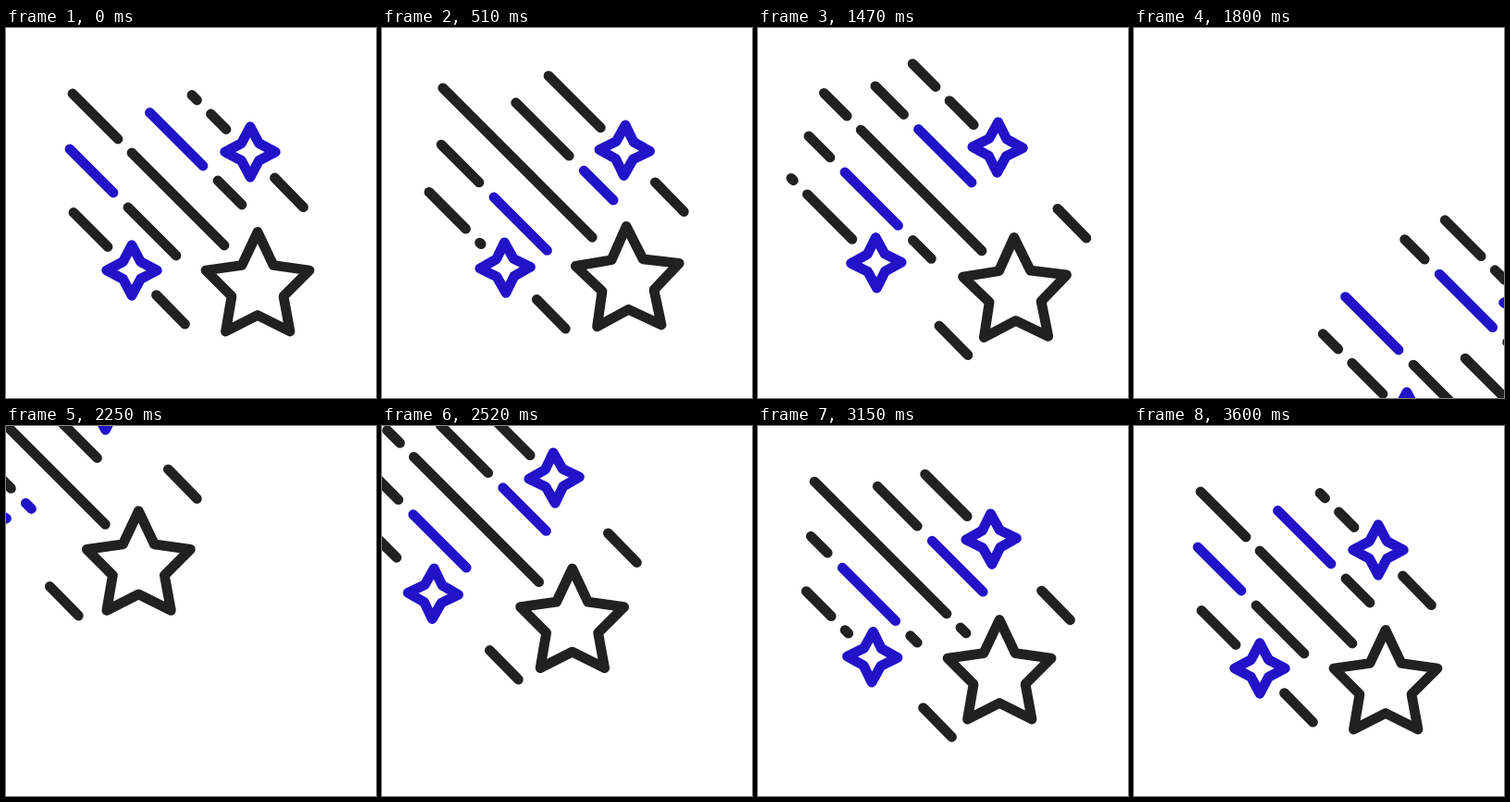
Write an HTML page that moves like this. It is 400 px wide and 400 px high and loops after 5630 ms.

```html
<!DOCTYPE html>
<html lang="en">
<head>
<meta charset="utf-8">
<title>Shooting stars</title>
<style>
  html, body { margin: 0; width: 100%; height: 100%; overflow: hidden; background: #fff; }
  svg { display: block; width: 100%; height: 100%; }
  path { fill: none; stroke-width: 10.8; stroke-linecap: round; stroke-linejoin: round; }
  .dark { stroke: #212121; }
  .blue { stroke: #2212c8; }
</style>
</head>
<body>
<svg viewBox="0 0 400 400">
  <g id="trails"></g>
  <path id="dashR" class="dark" d="M290.5 162l31 31.7"/>
  <path id="dashL" class="dark" d="M162.5 288.6l31 31.6"/>
  <path id="sparkR" class="blue"/>
  <path id="sparkL" class="blue"/>
  <path id="star" class="dark"
    d="M272 220.5L289 256.5L328 262L300 290L307 328L272 310.5L237.5 328L244 290L216 262L255 256.5Z"/>
</svg>
<script>
const LOOP = 5630, END = 3600, STEP = 30, HALF = END / 2;
const { sin, cos, exp, abs, max, min, floor, sqrt, PI } = Math;
const $ = id => document.getElementById(id);

// Offset along the diagonal: drift back, shoot out bottom right, glide in from top left.
const flight = (pull, launch, depth, tau) => t =>
  t < launch + 480
    ? -pull * t / 990 + 0.00165 * max(0, t - launch) ** 2
    : -depth * (exp((HALF - t) / tau) - exp(-HALF / tau));

const main = flight(12, 1350, 379, 435);
const front = flight(12, 1320, 379, 435);
const sideR = flight(3.3, 1480, 495, 405);
const sideL = flight(5.5, 1480, 513, 405);
const inner = flight(9.5, 1480, 493, 405);

// Front dashes bounce ahead of the star, then slide forward during the return.
const lead = t => t < HALF
  ? 48 * abs(sin(PI * t / 475))
  : max(0, min((t - 1710) / 40, (3420 - t) / 10));

const turn = t => sin(2 * PI * t / END);
const wave = t => sqrt(sin(PI * t / END)) * sin(2 * PI * (t - 552) / 2160);
const reach = t => 29 * sin(PI * (t / END) ** 0.75);

// Distance the dashes have run back along their trail.
const steady = (total, swing) => t => total * t / END + swing * wave(t);
const easing = total => t => total * (1 - (1 - t / END) ** 1.38);

const long = { gap: 15, period: 200, flow: steady(600, -32) };
const mixed = { gap: 16, period: 73.5, flow: steady(588, 49), two: true };
const short = { gap: 15, period: 78, flow: easing(624), reach };

// shift: x - y along the trail; gapAt: centre of one gap at time 0
const trails = [
  { ...long, shift: 1, from: 72, to: 236, gapAt: 128.5, head: main, tail: flight(12, 1368, 379, 435) },
  { ...mixed, shift: -62, from: 69, to: 184, gapAt: 124, head: flight(10, 1365, 493, 405), tail: inner },
  { ...mixed, shift: 64, from: 141, to: 255, gapAt: 221, head: inner, tail: inner },
  { ...short, shift: -126.5, from: 73, to: 110, gapAt: 63.5, head: sideL, tail: sideL },
  { ...short, shift: 128.5, from: 201, to: 238, gapAt: 214, head: sideR, tail: sideR }
];

function addPath(cls) {
  const p = document.createElementNS("http://www.w3.org/2000/svg", "path");
  p.setAttribute("class", cls);
  return $("trails").appendChild(p);
}
for (const tr of trails) tr.paths = ["dark", "blue"].map(addPath);

function drawTrail(tr, t) {
  const d = ["", ""], off = tr.head(t);
  const lo = tr.from + tr.tail(t) - (tr.reach ? tr.reach(t) : 0), hi = tr.to + off;
  const origin = tr.gapAt + off - tr.flow(t);
  let k = floor((lo - origin) / tr.period) - 1;
  for (; origin + k * tr.period < hi; k++) {
    const a = max(lo, origin + k * tr.period + tr.gap / 2);
    const b = min(hi, origin + (k + 1) * tr.period - tr.gap / 2);
    if (b < a) continue;
    const len = max(0.01, b - a);
    d[tr.two ? abs(k % 2) : 0] += `M${a} ${a - tr.shift}l${len} ${len}`;
  }
  tr.paths.forEach((p, i) => p.setAttribute("d", d[i]));
}

const TIP = 27.3, DIP = 9.4;
const sparkShape = "M" + [0, 1, 2, 3].map(i => {
  const s = sin(i * PI / 2), c = cos(i * PI / 2);
  return `${TIP * s} ${-TIP * c}L${DIP * (c + s)} ${DIP * (s - c)}`;
}).join("L") + "Z";
for (const id of ["sparkR", "sparkL"]) $(id).setAttribute("d", sparkShape);

const place = (id, x, y, spin = "0") =>
  $(id).setAttribute("transform", `translate(${x} ${y}) rotate(${spin})`);

function draw(t) {
  for (const tr of trails) drawTrail(tr, t);
  const m = main(t), f = front(t) + lead(t), r = sideR(t), l = sideL(t), a = turn(t);
  place("star", m, m, `${-2 * max(0, a)} 272 282`);
  place("dashR", f, f);
  place("dashL", f, f);
  place("sparkR", 264 + r, 134 + r, 2.2 * a);
  place("sparkL", 136 + l, 262 + l, -2.2 * a);
}

const begin = performance.now();
function tick() {
  const t = max(0, performance.now() - begin) % LOOP;
  // At the end of the flight everything rests in its starting pose.
  draw(floor(t / STEP) * STEP % max(END, t >= END ? 1 : END) * (t < END));
  requestAnimationFrame(tick);
}
tick();
</script>
</body>
</html>
```
